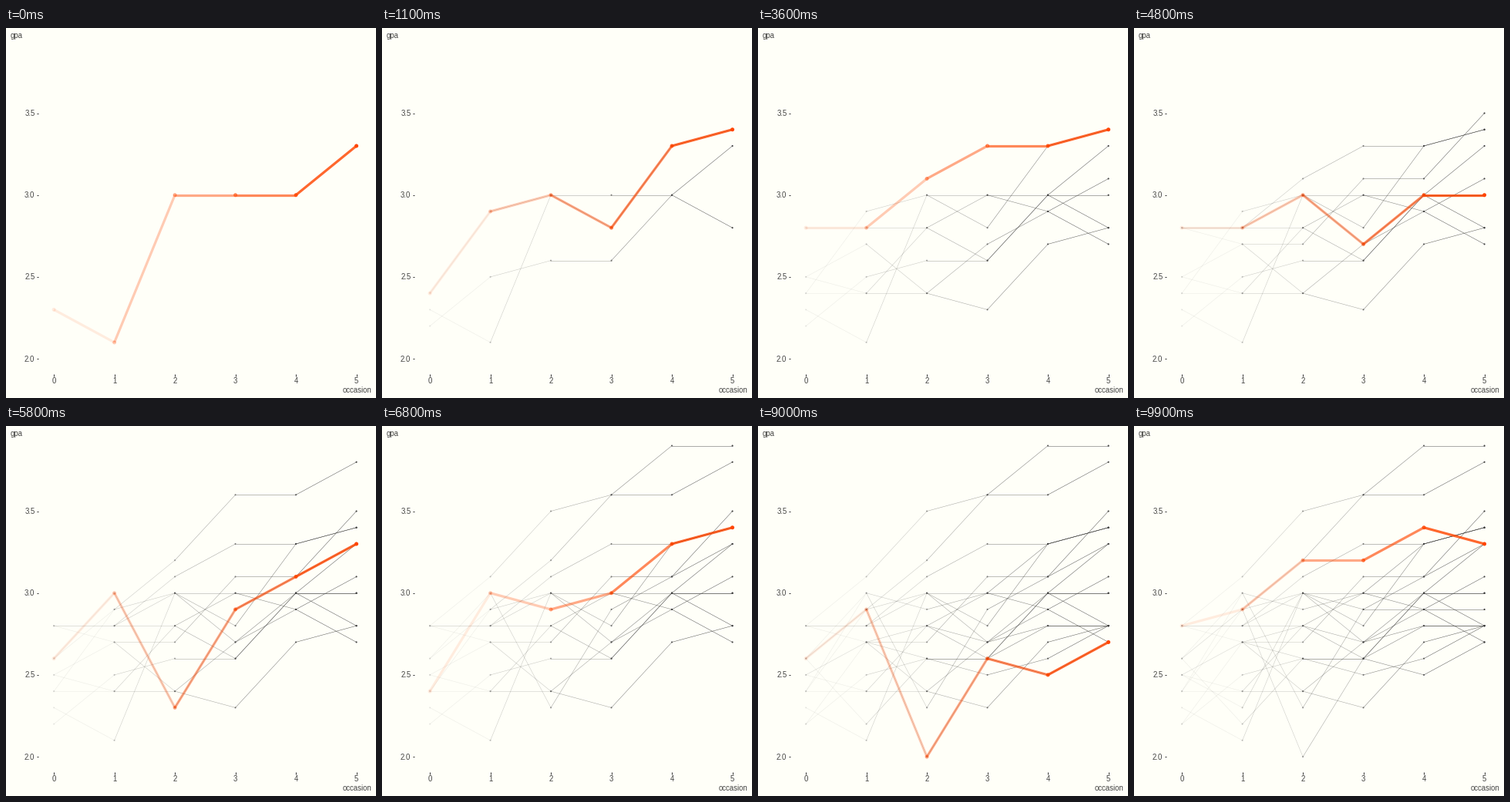
Write a matplotlib script that moves like this. It is 480x480 px and loops after 10 s.

```python
import matplotlib.pyplot as plt
from matplotlib.animation import FuncAnimation
from matplotlib.collections import LineCollection
from matplotlib.colors import to_rgba

SIZE, DPI = 480, 72  # at 72 dpi one point is one pixel
FRAMES, INTERVAL = 100, 100
BG, RED, GREY, INK = "#fffff8", "#ff4500", "#404040", "#444444"

# Six grades per student, each written in tenths.
GRADES = """
23 21 30 30 30 33
22 25 26 26 30 28
24 29 30 28 33 34
25 27 24 27 29 27
28 28 28 30 29 31
25 24 24 23 27 28
24 24 28 26 30 30
28 28 31 33 33 34
28 27 27 31 31 35
28 28 30 27 30 30
26 29 32 36 36 38
26 30 23 29 31 33
28 31 35 36 39 39
24 30 29 30 33 34
22 27 26 26 28 28
25 27 28 27 28 28
26 22 26 25 26 28
26 29 20 26 25 27
25 23 30 29 29 29
28 29 32 32 34 33
"""
STUDENTS = [[int(g) / 10 for g in row.split()]
            for row in GRADES.strip().splitlines()]
STARTS = [round(i * (FRAMES - 1) / (len(STUDENTS) - 1))
          for i in range(len(STUDENTS))]
ALPHAS = [0.1 + 0.18 * k for k in range(6)]


def px(occasion):
    return 62.1 + 78.5 * occasion


def py(gpa):
    return 110.5 + 212.4 * (3.5 - gpa)


plt.rcParams["font.family"] = "Liberation Sans"
fig = plt.figure(figsize=(SIZE / DPI, SIZE / DPI), dpi=DPI, facecolor=BG)
ax = fig.add_axes([0, 0, 1, 1])
ax.set_xlim(0, SIZE)
ax.set_ylim(SIZE, 0)
ax.axis("off")


def label(x, y, text, ha):
    ax.text(x, y, text, ha=ha, va="baseline", fontsize=9.6, color=INK)


def draw_axes():
    tick = dict(color="#333333", lw=1, solid_capstyle="butt")
    for gpa in (2.0, 2.5, 3.0, 3.5):
        ax.plot([39.7, 42.4], [py(gpa)] * 2, **tick)
        label(37.4, py(gpa) + 3.5, f"{gpa:.1f}", "right")
    for k in range(6):
        ax.plot([px(k)] * 2, [449, 451.7], **tick)
        label(px(k), 461, str(k), "center")
    label(5.4, 13, "gpa", "left")
    label(474.5, 473, "occasion", "right")


def draw_student(grades, color, width, diameter, z):
    """Line and dots that gain opacity from left to right."""
    pts = [(px(k), py(g)) for k, g in enumerate(grades)]
    shades = [to_rgba(color, a) for a in ALPHAS]
    line = LineCollection(list(zip(pts, pts[1:])), colors=shades[:-1],
                          linewidths=width, capstyle="butt", zorder=z)
    ax.add_collection(line)
    dots = ax.scatter(*zip(*pts), s=diameter ** 2, c=shades,
                      linewidths=0, zorder=z + 1)
    return line, dots


draw_axes()
trails = [draw_student(s, GREY, 0.53, 2.1, 3) for s in STUDENTS]
leads = [draw_student(s, RED, 3.2, 5, 6) for s in STUDENTS]


def update(frame):
    current = sum(start <= frame for start in STARTS) - 1
    for i, start in enumerate(STARTS):
        # A trail appears one frame after its red line.
        for artist in trails[i]:
            artist.set_visible(start < frame)
        for artist in leads[i]:
            artist.set_visible(i == current)
    return [a for pair in trails + leads for a in pair]


anim = FuncAnimation(fig, update, frames=FRAMES, interval=INTERVAL,
                     repeat=True, repeat_delay=0, blit=False)
plt.show()
```
